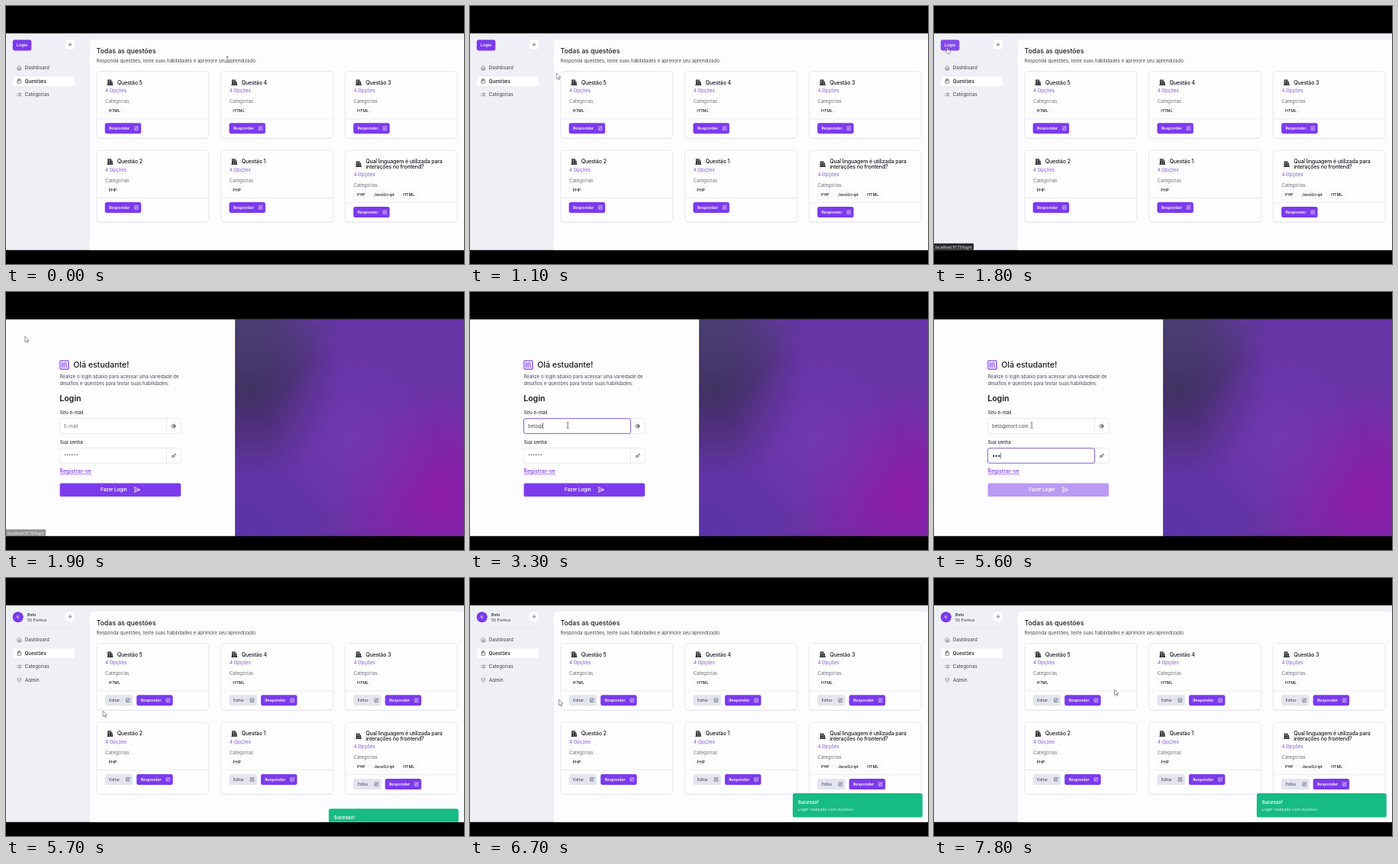
An HTML page for the animation above (8 s loop, 600 by 338 pixels).

```html
<!DOCTYPE html>
<html lang="pt-BR">
<head>
<meta charset="utf-8">
<title>Questões</title>
<style>
  html, body { margin: 0; width: 100%; height: 100%; overflow: hidden; background: #000; }
  svg { display: block; width: 600px; height: 338px; }
  text { font-family: Inter, "Liberation Sans", sans-serif; white-space: pre; }
  .status text { font-family: "Noto Sans", "Open Sans", sans-serif; }
</style>
</head>
<body>
<svg id="stage" viewBox="0 0 600 338" xmlns="http://www.w3.org/2000/svg"></svg>
<script>
const LOOP = 8000, STEP = 100;
const PURPLE = '#7c3aed', INK = '#18181f', MUTED = '#6f6f7b', LINE = '#e3e3ed';
const SM = 5.27, MD = 6.15, LG = 7.03;

const ICONS = {
  home: 'M3 9l9-7 9 7v11a2 2 0 0 1-2 2H5a2 2 0 0 1-2-2zM9 22V12h6v10',
  stack: 'M7 2h10M5 6h14M5 10h14a2 2 0 0 1 2 2v8a2 2 0 0 1-2 2H5a2 2 0 0 1-2-2v-8a2 2 0 0 1 2-2z',
  list: 'M8 6h13M8 12h13M8 18h13M3 6h.01M3 12h.01M3 18h.01',
  shield: 'M20 13c0 5-3.5 7.5-8 9-4.500-1.500-8-4-8-9V6a1 1 0 0 1 1-1c2 0 5-1.200 7-3 2 1.800 5 3 7 3a1 1 0 0 1 1 1zM9 12l2 2 4-4',
  sun: 'M16 12a4 4 0 1 1-8 0 4 4 0 0 1 8 0zM12 2v2M12 20v2M5 5l1.400 1.400M17.600 17.600L19 19M2 12h2M20 12h2M6.400 17.600L5 19M19 5l-1.400 1.400',
  edit: 'M12 3H5a2 2 0 0 0-2 2v14a2 2 0 0 0 2 2h14a2 2 0 0 0 2-2v-7M18.400 2.600a2.100 2.100 0 0 1 3 3L12 15l-4 1 1-4z',
  shelf: 'M5 3h14a2 2 0 0 1 2 2v14a2 2 0 0 1-2 2H5a2 2 0 0 1-2-2V5a2 2 0 0 1 2-2zM7.500 7v10M11.500 7v10M15 7l2 10',
  send: 'M3 3l3 9-3 9 19-9zM6 12h16',
  key: 'M13 15.500a5.500 5.500 0 1 1-11 0 5.500 5.500 0 0 1 11 0zM21 2l-9.600 9.600M15.500 7.500l3 3L22 7l-3-3',
  at: 'M16 12a4 4 0 1 1-8 0 4 4 0 0 1 8 0zM16 8v5a3 3 0 0 0 6 0v-1a10 10 0 1 0-4 8'
};

// Text is placed by its left edge and the middle of its capitals.
const text = (x, cy, str, size, fill = INK, weight = 400, extra = '') =>
  `<text x="${x}" y="${cy + size * 0.36}" font-size="${size}" fill="${fill}" font-weight="${weight}" ${extra}>${str}</text>`;
const rect = (x, y, w, h, fill, r = 0, extra = '') =>
  `<rect x="${x}" y="${y}" width="${w}" height="${h}" rx="${r}" fill="${fill}" ${extra}/>`;
const icon = (name, cx, cy, size, color, width = 2) =>
  `<path d="${ICONS[name]}" transform="translate(${cx - size / 2} ${cy - size / 2}) scale(${size / 24})" fill="none" stroke="${color}" stroke-width="${width}" stroke-linecap="round" stroke-linejoin="round"/>`;
const group = (id, body, extra = '') => `<g id="${id}" ${extra}>${body}</g>`;
const border = (color, width = 0.6) => `stroke="${color}" stroke-width="${width}"`;

function button(x, cy, w, label, bg, fg, weight) {
  return rect(x, cy - 7, w, 14, bg, 2.6) +
    text(x + 5.4, cy, label, 5.2, fg, weight) +
    icon('edit', x + w - 6.4, cy, 6.2, fg, 2.2);
}

function badges(x, cy, labels) {
  const widths = { HTML: 24.6, PHP: 20, JavaScript: 36.2 };
  return labels.map(label => {
    const w = widths[label];
    const part = rect(x, cy - 5, w, 10, '#fff', 5, border('#e6e6ef', 0.5)) +
      text(x + 4.800, cy, label, SM, INK, 500);
    x += w + 2;
    return part;
  }).join('');
}

function bookIcon(x, cy) {
  return `<g transform="translate(${x} ${cy - 4})">` +
    '<path d="M.8 .3h4.800v7.400H.8z" fill="#2b2b33"/>' +
    '<path d="M2 1.800h2.300M2 3.200h2.300M3.200 4.800v2.900" stroke="#fff" stroke-width=".55"/>' +
    '<path d="M5.900 2.200l1.200 .3 .7 5.200H5.900zM0 7.100h8v.8H0z" fill="#2b2b33"/></g>';
}

function card(col, row, lines, tags) {
  const x = 118.7 + col * 162.75, y = row ? 189.2 : 85.5;
  const h = row ? 93.8 : 87.6, shift = (lines.length - 1) * 6.2;
  const mid = y + 14.7 + (lines.length > 1 ? 3.2 : 0);
  const titles = lines.map((line, i) =>
    text(x + 27, mid + (i - (lines.length - 1) / 2) * 7.1, line, LG, INK, 500, 'letter-spacing="-.15"')).join('');
  const foot = y + 74.7 + shift, bx = x + 10.900;
  return rect(x, y + 0.8, 147, h, '#e9e9f2', 4.4) +
    rect(x, y, 147, h, '#fefeff', 4.4, border(LINE, 0.8)) +
    bookIcon(x + 13.600, mid) + titles +
    text(x + 11.2, y + 25.700 + shift, '4 Opções', MD, '#8150e4') +
    text(x + 11.2, y + 39.3 + shift, 'Categorias', MD, MUTED) +
    badges(x + 11, y + 51.800 + shift, tags) +
    rect(x, y + 62 + shift, 147, 0.7, LINE) +
    `<g class="guest">${button(bx, foot, 47.5, 'Responder', PURPLE, '#fff', 600)}</g>` +
    `<g class="member">${button(bx, foot, 36.5, 'Editar', '#e2e4ef', '#454552', 400)}` +
    `${button(bx + 41.5, foot, 47.5, 'Responder', PURPLE, '#fff', 600)}</g>`;
}

function navItem(i, name, label) {
  const cy = 81 + i * 17.5, on = i === 1;
  return (on ? rect(9, cy - 6, 81, 12.2, '#fff', 2.4) : '') +
    icon(name, 17.4, cy, 6.6, on ? INK : '#555562') +
    text(24.8, cy, label, MD, on ? INK : '#555562', 500);
}

function home() {
  const cards = [
    ['Questão 5'], ['Questão 4'], ['Questão 3'], ['Questão 2'], ['Questão 1'],
    ['Qual linguagem é utilizada para', 'interações no frontend?']
  ];
  const tags = i => i < 3 ? ['HTML'] : i < 5 ? ['PHP'] : ['PHP', 'JavaScript', 'HTML'];
  return rect(0, 36, 600, 284, '#eff0f6') +
    '<path d="M110 320V48a4 4 0 0 1 4-4h482a4 4 0 0 1 4 4v272z" fill="#fdfdff"/>' +
    `<g class="guest">${rect(8.8, 44.2, 24.5, 14.2, PURPLE, 2.6, 'id="loginBtn"')}${text(14, 51.3, 'Login', SM, '#fff', 600)}</g>` +
    '<g class="member">' +
      `<circle cx="15.700" cy="51.200" r="7" fill="${PURPLE}"/>` +
      text(15.7, 51.2, 'B', SM, '#fff', 400, 'text-anchor="middle"') +
      text(28, 47.8, 'Beto', SM, INK, 500) + text(28, 55, '55 Pontos', SM, '#33333d') +
      navItem(3, 'shield', 'Admin') +
    '</g>' +
    rect(77.8, 44.5, 12.2, 12, '#fff', 2.4) + icon('sun', 83.9, 50.5, 5.4, '#33333d') +
    rect(9, 65.7, 81, 0.6, '#e0e1ea') +
    navItem(0, 'home', 'Dashboard') + navItem(1, 'stack', 'Questões') + navItem(2, 'list', 'Categorias') +
    text(118.6, 59.3, 'Todas as questões', 8.7, INK, 500) +
    text(118.6, 71.5, 'Responda questões, teste suas habilidades e aprimore seu aprendizado.', MD, '#45454f') +
    cards.map((lines, i) => card(i % 3, Math.floor(i / 3), lines, tags(i))).join('') +
    group('toast', rect(422.8, 0, 170, 31.5, '#10b981', 2.6, 'fill-opacity=".97"') +
      text(429.5, 11.4, 'Sucesso!', MD, '#fff', 600) +
      text(429.5, 20.7, 'Login realizado com sucesso.', SM, '#dcf6ec'));
}

function field(id, y, label, name) {
  return text(70.4, y - 8.2, label, MD, INK) +
    rect(70.5, y, 158.600, 19.6, '#fff', 2.6, border('#dfdfe9', 0.7)) +
    `<path d="M210.500 ${y}v19.600" ${border('#dfdfe9', 0.7)}/>` +
    icon(name, 219.8, y + 9.900, 6, INK, 2.4) +
    rect(70.5, y, 140, 19.6, 'none', 2.2, `id="${id}Ring" ${border('#7657d4', 0.9)}`);
}

function login() {
  const blobs = ['dark', 'slate', 'pink', 'blue', 'glow'].map(b => rect(300, 36, 300, 284, `url(#${b})`)).join('');
  return rect(0, 36, 300, 284, '#fdfdff') + rect(300, 36, 300, 284, '#6734a5') + blobs +
    icon('shelf', 76.4, 95.6, 14.8, PURPLE) +
    text(88.2, 95.5, 'Olá estudante!', 10.54, INK, 500) +
    text(70.4, 110.7, 'Realize o login abaixo para acessar uma variedade de', MD, '#45454f') +
    text(70.4, 119.5, 'desafios e questões para testar suas habilidades.', MD, '#45454f') +
    text(70.2, 139.6, 'Login', 10.54, INK, 600) +
    field('mail', 165.8, 'Seu e-mail', 'at') + field('pass', 204.6, 'Sua senha', 'key') +
    text(76, 175.7, '', MD, MUTED, 400, 'id="mail"') +
    text(76, 215, '******', MD, MUTED, 400, 'id="hint"') +
    [0, 1, 2].map(i => `<circle class="dot" cx="${78.2 + i * 3.5}" cy="214.800" r="1.150" fill="${INK}"/>`).join('') +
    rect(0, 0, 0.6, 7.6, INK, 0, 'id="caret"') +
    text(70.3, 234.6, 'Registrar-se', LG, PURPLE, 500) + rect(70.5, 238.1, 41.6, 0.6, PURPLE) +
    rect(70.5, 250.5, 158.6, 17.6, PURPLE, 2.6, 'id="submit"') +
    text(124, 259.2, 'Fazer Login', MD, '#fff', 600) + icon('send', 171.5, 259.2, 9, '#fff');
}

const blob = (id, x, y, r, color, alpha) =>
  `<radialGradient id="${id}" gradientUnits="userSpaceOnUse" cx="${x}" cy="${y}" r="${r}">` +
  `<stop offset="0" stop-color="${color}" stop-opacity="${alpha}"/>` +
  `<stop offset=".5" stop-color="${color}" stop-opacity="${alpha * 0.55}"/>` +
  `<stop offset="1" stop-color="${color}" stop-opacity="0"/></radialGradient>`;

const pointers =
  group('arrow', `<path d="M0 0v7.600l1.800-1.600 1.200 2.700 1.200-.5-1.200-2.700h2.400z" fill="#fff" ${border('#55555d', 0.6)} stroke-linejoin="round"/>`) +
  group('beam', `<path d="M-1.600-3.700h1.200L0-3.300l.4-.4h1.200M0-3.300v6.600M-1.600 3.700h1.200L0 3.300l.4.400h1.200" fill="none" ${border('#333338', 0.65)}/>`) +
  group('hand', `<path transform="translate(-2.300 0)" d="M1.600 5V1a.7.7 0 0 1 1.400 0v2.400l2.400.6a1 1 0 0 1 .7 1v1.500l-.7 2H2.400L.3 5.600a.6.6 0 0 1 1-.8z" fill="#fff" ${border('#44444c', 0.55)}/>`);

const stage = document.getElementById('stage');
stage.innerHTML = '<defs>' +
  blob('dark', 320, 125, 120, '#3c2d5d', 0.95) + blob('slate', 312, 30, 130, '#414460', 0.75) +
  blob('pink', 570, 268, 150, '#931aa8', 0.9) + blob('blue', 310, 320, 130, '#5634a8', 0.8) +
  blob('glow', 455, 190, 110, '#7639b8', 0.7) +
  '<clipPath id="view"><path d="M0 0h600v319.700H0z"/></clipPath></defs>' +
  rect(0, 0, 600, 338, '#000') + rect(0, 34.8, 600, 1.2, '#28282c') +
  '<g clip-path="url(#view)">' + group('home', home()) + group('login', login()) +
  group('status', rect(0, 311, 52, 9, '#2c2c31', 1) + text(2, 315.700, 'localhost:5173/login', 5, '#f4f4f4'), 'class="status"') +
  pointers + '</g>';

const el = {};
stage.querySelectorAll('[id]').forEach(node => el[node.id] = node);
const show = (node, on) => node.style.display = on ? '' : 'none';
const showAll = (cls, on) => stage.querySelectorAll(cls).forEach(node => show(node, on));

const EMAIL = 'beto@moril.com';
const KEYS = [2900, 3000, 3100, 3200, 3300, 3600, 3700, 3800, 4000, 4200, 4300, 4400, 4500, 4600];
const PATH = [
  [0, 290, 70, 'beam'], [500, 290, 70, 'beam'], [600, 293, 75, 'arrow'], [900, 190, 104, 'arrow'],
  [1200, 75, 80, 'arrow'], [1400, 28, 52, 'arrow'], [1500, 20, 51, 'hand'], [1600, 17.5, 54, 'hand'],
  [1800, 17.5, 54, 'hand'], [1900, 24.8, 58, 'arrow'], [2200, 117, 156, 'arrow'], [2300, 128, 174.5, 'beam'],
  [5600, 128, 174.5, 'beam'], [5700, 127, 174, 'arrow'], [6500, 127, 174, 'arrow'], [6800, 111, 152, 'arrow'],
  [7000, 116, 122, 'arrow'], [7200, 138, 114, 'arrow'], [7300, 153, 114, 'arrow'], [7400, 147, 121, 'arrow'],
  [7600, 182, 154, 'arrow'], [7800, 236.5, 146, 'arrow'], [LOOP, 236.5, 146, 'arrow']
];

function pointerAt(t) {
  const i = PATH.findIndex((p, n) => t >= p[0] && t < PATH[n + 1][0]);
  const [t0, x0, y0, kind] = PATH[i], [t1, x1, y1] = PATH[i + 1];
  const k = (t - t0) / (t1 - t0);
  return { x: x0 + (x1 - x0) * k, y: y0 + (y1 - y0) * k, kind };
}

function drawForm(t) {
  const typed = KEYS.filter(k => t >= k).length;
  const onMail = t >= 2400 && t < 4700, onPass = t >= 4700;
  const dots = t >= 5300 ? 3 : t >= 5100 ? 2 : 0;
  el.mail.textContent = typed ? EMAIL.slice(0, typed) : 'E-mail';
  el.mail.setAttribute('fill', typed ? '#45454f' : MUTED);
  show(el.mailRing, onMail);
  show(el.passRing, onPass);
  show(el.hint, !dots);
  stage.querySelectorAll('.dot').forEach((dot, i) => show(dot, i < dots));
  show(el.caret, onMail || onPass);
  el.caret.setAttribute('x', onPass ? 76.4 + dots * 3.5 : 76.2 + (typed ? el.mail.getComputedTextLength() : 0));
  el.caret.setAttribute('y', onPass ? 210.7 : 171.7);
  el.submit.setAttribute('fill', t >= 5600 ? '#ba9af5' : PURPLE);
}

function draw(t) {
  const member = t >= 5700, form = t >= 1900 && !member;
  show(el.home, !form);
  show(el.login, form);
  showAll('.guest', !member);
  showAll('.member', member);
  if (form) drawForm(t);

  el.loginBtn.setAttribute('fill', t >= 1500 ? '#8449ec' : PURPLE);
  show(el.status, t >= 1600 && t < 2000);
  el.status.setAttribute('opacity', t < 1900 ? 1 : 0.5);
  show(el.toast, member);
  el.toast.setAttribute('transform', `translate(0 ${t < 5800 ? 302.3 : t < 5900 ? 287 : 282})`);

  const p = pointerAt(t);
  for (const kind of ['arrow', 'beam', 'hand']) show(el[kind], kind === p.kind);
  el[p.kind].setAttribute('transform', `translate(${p.x} ${p.y})`);
}

const start = performance.now();
let last = -1;
function tick() {
  const t = Math.floor((performance.now() - start) % LOOP / STEP) * STEP;
  if (t !== last) draw(last = t);
  requestAnimationFrame(tick);
}
tick();
</script>
</body>
</html>
```
